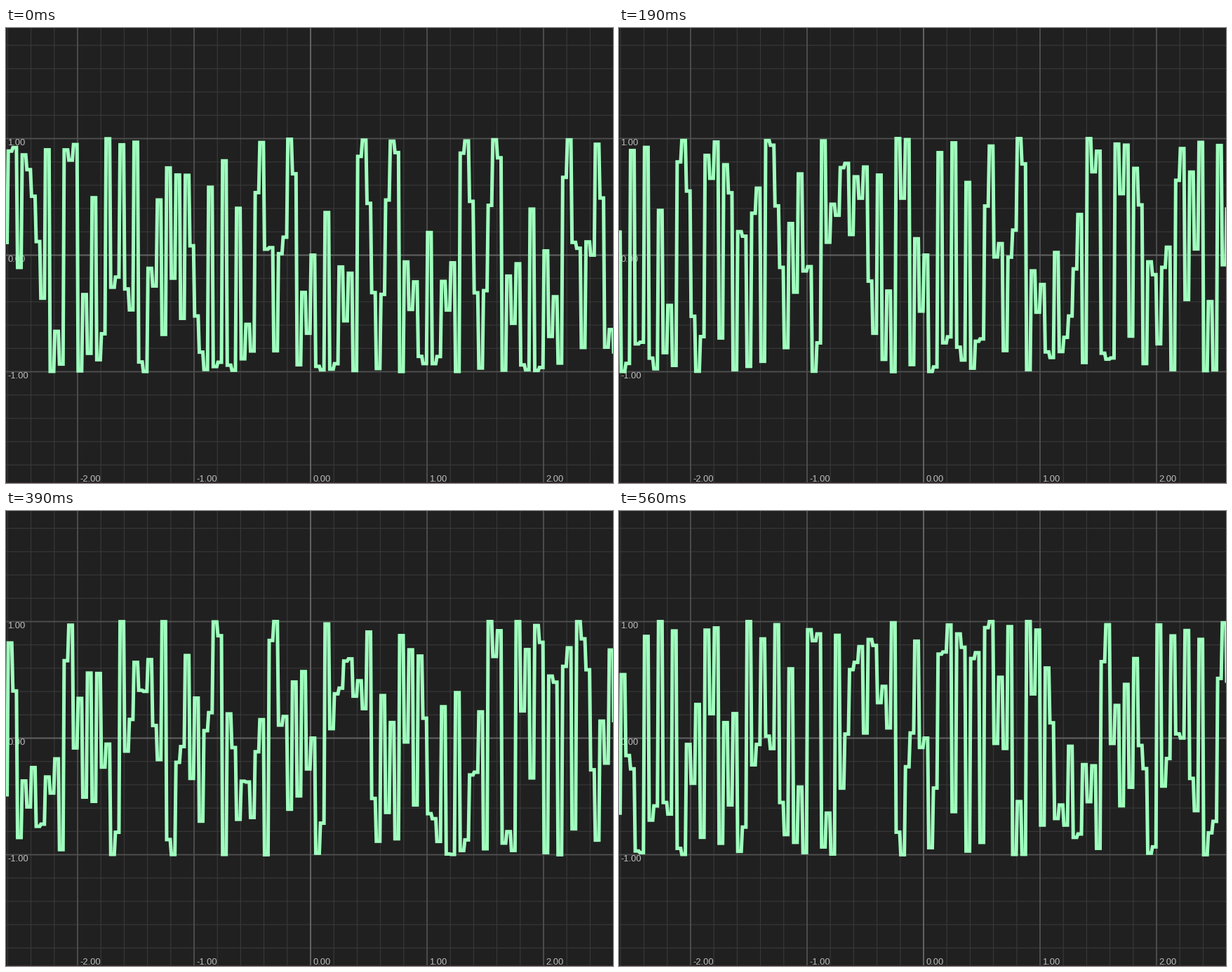
Animation of 865 by 648 pixels, one loop 600 ms. Source, as a matplotlib script:

```python
import numpy as np
import matplotlib.pyplot as plt
from matplotlib.animation import FuncAnimation

W, H, DPI = 865, 648, 100
LOOP_MS, TICK_MS = 600, 10
CX, CY, UNIT = 434, 323.5, 166      # plot origin and pixels per unit
STEP = UNIT / 25                    # width of one stair
INSET = 0.8                         # half the slant of a riser

BG, MINOR, MAJOR, AXIS = "#202020", "#3a3a3a", "#505050", "#626262"
LABEL, CURVE = "#bcbcbc", "#a0ffbe"


def pt(px):
    return px * 72 / DPI


fig = plt.figure(figsize=(W / DPI, H / DPI), dpi=DPI, facecolor=BG)
ax = fig.add_axes([0, 0, 1, 1])
ax.set_xlim(0, W)
ax.set_ylim(H, 0)
ax.axis("off")


def line(xs, ys, color, width, z):
    ax.plot(xs, ys, color=color, lw=pt(width), zorder=z, snap=False)


def grid_style(k):
    """Colour, width and stacking order of the k-th line from the origin."""
    if k == 0:
        return AXIS, 2, 3
    return (MAJOR, 1.8, 2) if k % 5 == 0 else (MINOR, 1.1, 1)


def label(x, y, value):
    ax.text(x, y, f"{value:.2f}", color=LABEL, fontsize=pt(13),
            family="Liberation Sans", va="baseline", zorder=4)


for k in range(-13, 14):
    x, y = CX + k * UNIT / 5, CY + k * UNIT / 5
    line([x, x], [0, H], *grid_style(k))
    if 0 < y < H:
        line([0, W], [y, y], *grid_style(k))
line([0, W], [H - 0.5] * 2, "#3b2a30", 1, 3)

for v in range(-2, 3):
    label(CX + v * UNIT + 3.5, 646, v)
for v in (-1, 0, 1):
    label(2.5, CY - v * UNIT + 9.5, v)

# Stairs of sin(n^2 + n * tau), with slightly slanted risers
n = np.arange(-67, 68)
left = CX + n * STEP
stair_x = np.column_stack([left + INSET, left + STEP - INSET]).ravel()
curve, = ax.plot([], [], color=CURVE, lw=pt(5), zorder=5,
                 solid_joinstyle="miter", solid_capstyle="butt")

# The picture changes every 40 ms, with a short first and a long late hold
changes = np.r_[0, 30 + 40 * np.arange(13), 560]


def update(i):
    pose = np.searchsorted(changes, i * TICK_MS, side="right") - 1
    # The clock advances in whole ticks of 1/240
    tau = 3.4078 + np.floor(11.2 * pose + 0.25) / 240
    y = CY - UNIT * np.sin(n * (n + tau))
    curve.set_data(stair_x, np.repeat(y, 2))
    return curve,


anim = FuncAnimation(fig, update, frames=LOOP_MS // TICK_MS,
                     interval=TICK_MS, repeat=True, repeat_delay=0)
plt.show()
```
